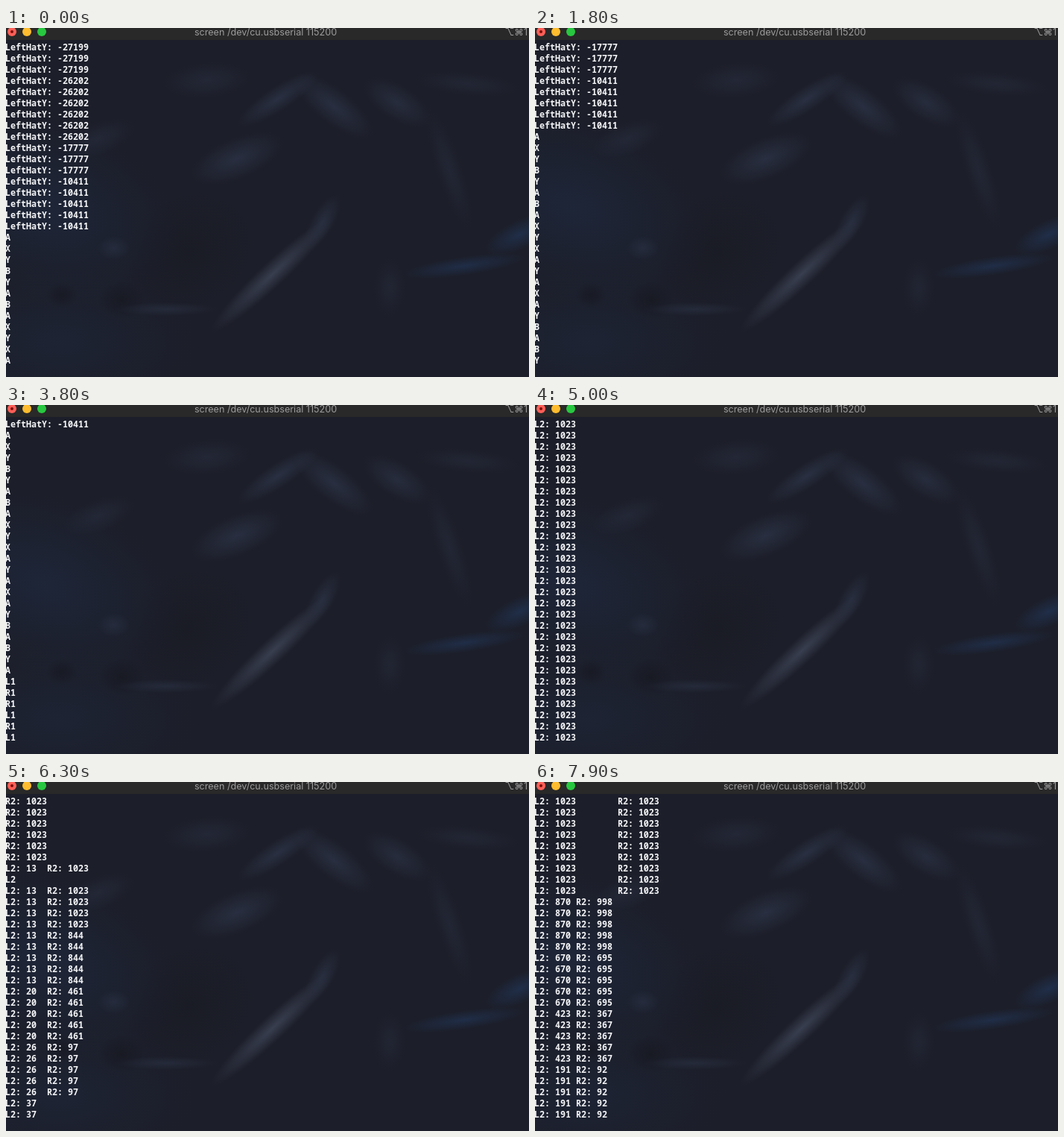
These frames come from a looping animation (702x468 px, 8 s). An HTML page with a canvas:

```html
<!DOCTYPE html>
<html lang="en">
<head>
<meta charset="utf-8">
<title>Serial monitor</title>
<style>
  html, body { margin: 0; width: 100%; height: 100%; overflow: hidden; background: #1c1e29; }
  canvas { display: block; }
</style>
</head>
<body>
<canvas id="stage" width="702" height="468"></canvas>
<script>
const W = 702, H = 468, LOOP = 8000, ROWS = 29, LINE = 15;
const ctx = document.getElementById('stage').getContext('2d');

// --- Serial log: each entry is [time, 'text' or 'text*count', ...] ---
const both = 'L2: 1023\tR2: 1023';
const script = [
  [0, 'LeftHatY: -27199*3', 'LeftHatY: -26202*6', 'LeftHatY: -17777*3',
      'LeftHatY: -10411*5', ...'AXYBYABAXYXA'],
  [300, 'Y'], [500, 'A'], [700, 'X'], [900, 'A'], [1000, 'Y'],
  [1100, 'B'], [1300, 'A'], [1600, 'B'], [1800, 'Y'], [2000, 'A'],
  [2200, 'L1'], [2400, 'R1'], [3000, 'R1'], [3200, 'L1'],
  [3400, 'R1'], [3800, 'L1'], [3900, 'L1*2'], [4000, 'L1*2'], [4200, 'L1'],
  // left trigger
  [4700, 'L2: 66', 'L2', 'L2: 66*4', 'L2: 402*5', 'L2: 791*5'],
  [4800, 'L2: 1023*10'], [4900, 'L2: 1023*12'], [5000, 'L2: 1023*12'],
  [5200, 'L2: 850*5'], [5300, 'L2: 540*5'], [5400, 'L2: 210*5'],
  // right trigger
  [5500, 'L2: 30*3', 'R2: 25', 'R2', 'R2: 25'],
  [5600, 'R2: 330*5'], [5700, 'R2: 715*5'],
  [5800, 'R2: 1023*10'], [5900, 'R2: 1023*10'], [6000, 'R2: 1023*10'],
  [6100, 'L2: 13\tR2: 1023', 'L2', 'L2: 13\tR2: 1023*4'],
  [6200, 'L2: 13\tR2: 844*5', 'L2: 20\tR2: 461*5'],
  [6300, 'L2: 26\tR2: 97*5', 'L2: 37*2'],
  // both triggers
  [6400, 'L2: 37*3', 'L2: 268*5'], [6500, 'L2: 640*5', 'L2: 1023*5'],
  [6600, 'L2: 1023\tR2: 45', 'R2', 'L2: 1023\tR2: 45*4'],
  [6700, 'L2: 1023\tR2: 380*5'], [6800, 'L2: 1023\tR2: 760*5'],
  [6900, both + '*10'], [7000, both + '*12'], [7100, both + '*12'],
  [7500, 'L2: 870\tR2: 998*5'], [7600, 'L2: 670\tR2: 695*5'],
  [7700, 'L2: 423\tR2: 367*5'], [7800, 'L2: 191\tR2: 92*5']
];

const expandTabs = s => {
  const [head, tail] = s.split('\t');
  return tail ? head.padEnd(8 * (Math.floor(head.length / 8) + 1)) + tail : head;
};

const log = [];
for (const [time, ...items] of script) {
  for (const item of items) {
    const [text, count = 1] = item.split('*');
    for (let i = 0; i < count; i++) log.push({ time, text: expandTabs(text) });
  }
}

// --- Window with its faint blurred backdrop, painted once ---
function makeLayer() {
  const c = document.createElement('canvas');
  c.width = W;
  c.height = H;
  return c;
}

const backdrop = makeLayer();
const bg = backdrop.getContext('2d');

function glow(x, y, rx, ry, turn, rgb, alpha) {
  bg.save();
  bg.translate(x, y);
  bg.rotate(turn * Math.PI / 180);
  bg.scale(rx, ry);
  const g = bg.createRadialGradient(0, 0, 0, 0, 0, 1);
  g.addColorStop(0, `rgba(${rgb},${alpha})`);
  g.addColorStop(0.5, `rgba(${rgb},${alpha * 0.5})`);
  g.addColorStop(1, `rgba(${rgb},0)`);
  bg.fillStyle = g;
  bg.fillRect(-1, -1, 2, 2);
  bg.restore();
}

function disc(x, y, r, color) {
  bg.fillStyle = color;
  bg.beginPath();
  bg.arc(x, y, r, 0, 7);
  bg.fill();
}

function paintBackdrop() {
  const blue = '32,48,76', grey = '72,80,100', slate = '46,54,74', dark = '22,23,31';
  bg.fillStyle = '#1c1e29';
  bg.fillRect(0, 0, W, H);

  glow(50, 240, 190, 120, 20, blue, 0.42);
  glow(70, 420, 190, 100, 0, blue, 0.3);
  glow(75, 358, 22, 18, 0, dark, 0.7);
  glow(155, 365, 32, 26, 0, dark, 0.7);
  glow(145, 295, 22, 16, 0, slate, 0.5);
  glow(245, 300, 90, 75, -30, dark, 0.4);
  glow(125, 148, 50, 22, -20, slate, 0.4);
  glow(270, 70, 60, 24, -5, slate, 0.4);
  glow(365, 95, 65, 17, -33, slate, 0.75);
  glow(440, 105, 65, 24, 38, slate, 0.7);
  glow(525, 100, 52, 24, 32, slate, 0.6);
  glow(310, 175, 66, 28, -22, slate, 0.7);
  glow(620, 75, 70, 16, 5, slate, 0.35);
  glow(595, 190, 85, 18, 72, slate, 0.35);
  glow(358, 330, 112, 17, -43, grey, 0.65);
  glow(425, 260, 42, 16, -60, slate, 0.65);
  glow(215, 377, 70, 9, 0, slate, 0.5);
  glow(615, 319, 85, 13, -8, blue, 0.85);
  glow(690, 277, 52, 20, -25, blue, 0.9);
  glow(515, 348, 22, 40, 0, slate, 0.3);

  // title bar
  bg.fillStyle = '#292929';
  bg.fillRect(0, 0, W, 16);
  disc(8, 5, 6, '#ff5f57');
  disc(8, 5, 2, '#7a100c');
  disc(28, 5, 6, '#febc2e');
  disc(48, 5, 6, '#28c840');

  bg.fillStyle = '#9c9c9c';
  bg.font = '12.6px Inter, "Liberation Sans", sans-serif';
  bg.textAlign = 'center';
  bg.fillText('screen /dev/cu.usbserial 115200', 348.5, 10);
  bg.textAlign = 'right';
  bg.font = '12.6px Inter, "DejaVu Sans", sans-serif';
  bg.fillText('⌥⌘1', 700, 10);
}

function draw(t) {
  ctx.drawImage(backdrop, 0, 0);
  ctx.font = '600 11.667px "Noto Sans Mono", "DejaVu Sans Mono", monospace';
  ctx.fillStyle = '#f4f5f7';
  log.filter(l => l.time <= t).slice(-ROWS)
    .forEach((l, i) => ctx.fillText(l.text, -1, 30 + i * LINE));
}

paintBackdrop();
const start = performance.now();
function tick() {
  draw((performance.now() - start) % LOOP);
  requestAnimationFrame(tick);
}
tick();
</script>
</body>
</html>
```
